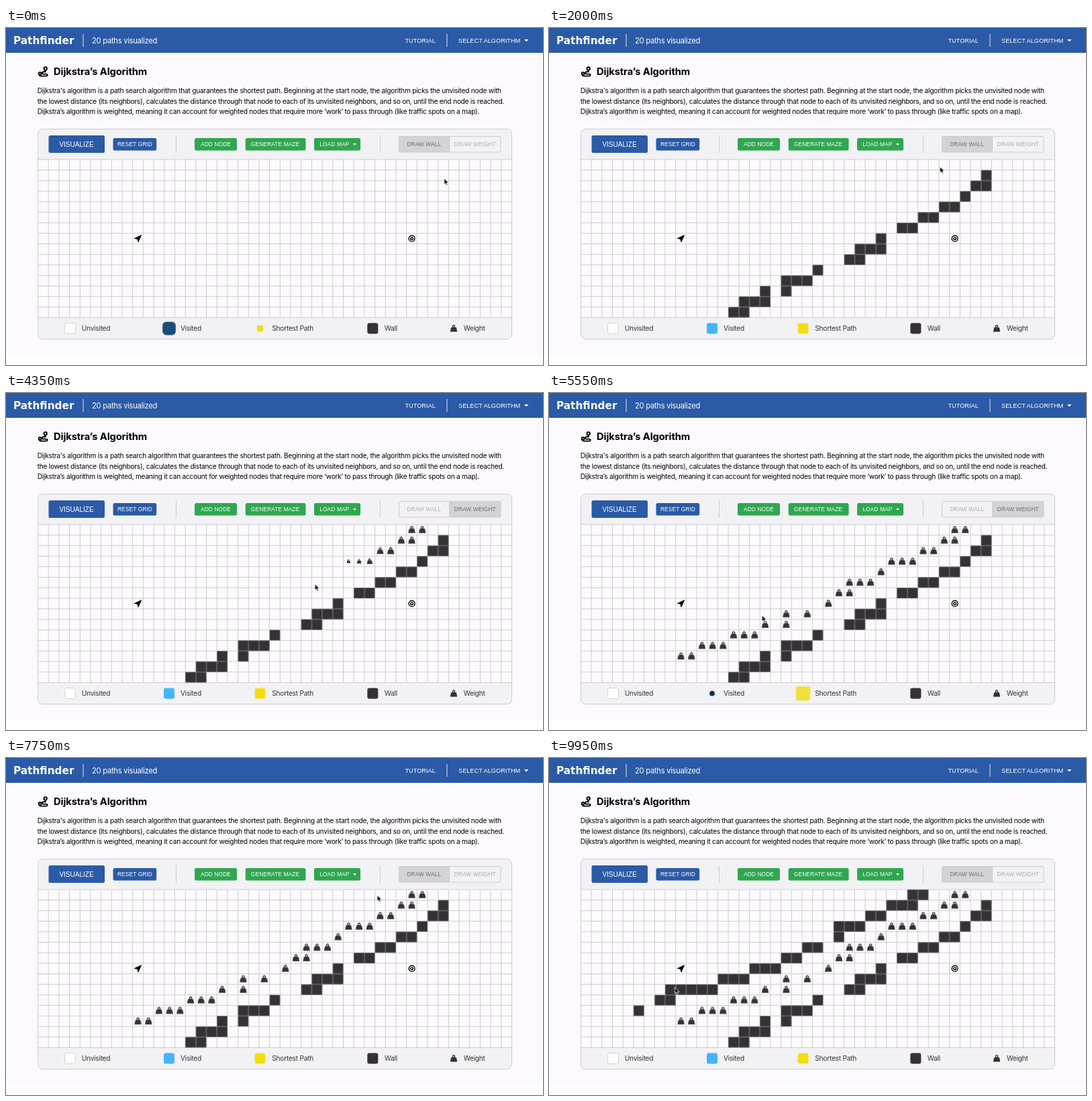
Recreate the animation shown at these times as an HTML page. Size 800 px wide and 502 px high, loop 10 s.

```html
<!DOCTYPE html>
<html lang="en">
<head>
<meta charset="utf-8">
<title>Pathfinder</title>
<style>
  html, body { margin: 0; width: 100%; height: 100%; overflow: hidden; background: #fcfafe; }
  svg { display: block; width: 800px; height: 502px; }
  text { font-family: Inter, "Open Sans", sans-serif; font-size: 10.2px; letter-spacing: -.255px; fill: #000; }
  .logo { font: bold 15.3px "DejaVu Sans", sans-serif; letter-spacing: 0; fill: #fff; }
  .count { font-size: 11.2px; letter-spacing: -.27px; fill: #fff; }
  .title { font-size: 14.7px; font-weight: 700; letter-spacing: -.1px; }
  .legend { fill: #333236; }
  .btn, .nav { font-family: "Liberation Sans", Arial, sans-serif; font-size: 8.4px; letter-spacing: .1px; fill: #fff; }
  .btn { text-anchor: middle; }
  .nav { font-size: 9.2px; letter-spacing: 0; }
  .big { font-size: 10px; letter-spacing: 0; }
  .blue { fill: #2b5aa6; }
  .green { fill: #2fa750; }
  .line { stroke: #cccbcf; fill: none; }
  .dark { fill: #343236; }
</style>
</head>
<body>
<svg viewBox="0 0 800 502" xmlns="http://www.w3.org/2000/svg">
  <defs>
    <rect id="wall" class="dark" x="-7.7" y="-7.7" width="15.4" height="15.4"/>
    <path id="weight" class="dark" fill-rule="evenodd" d="M-3.2-1.8H-1.7A2.3 2.3 0 1 1 1.7-1.8H3.2Q3.8-1.8 4-1.2L5.1 4Q5.2 4.8 4.4 4.8H-4.4Q-5.2 4.8-5.1 4L-4-1.2Q-3.8-1.8-3.2-1.8ZM0-4.3A1 1 0 1 0 0-2.3A1 1 0 1 0 0-4.3Z"/>
  </defs>

  <rect y="487" width="800" height="15" fill="#fff"/>
  <rect class="blue" width="800" height="37"/>
  <text class="logo" x="11" y="24">Pathfinder</text>
  <path d="M115 9V28M657 9V28" stroke="#fff" stroke-opacity=".85"/>
  <text class="count" x="128" y="22.5">20 paths visualized</text>
  <text class="nav" x="594.5" y="21.5">TUTORIAL</text>
  <text class="nav" x="674" y="21.5">SELECT ALGORITHM</text>
  <path d="M772 17h6.4l-3.2 3.5z" fill="#fff"/>

  <g fill="none" stroke="#000" stroke-width="1.9">
    <circle cx="58.7" cy="60.5" r="2.2"/>
    <path d="M58.7 63V65.3H56Q54 65.3 54 67T56 68.6H59.5Q61.7 68.6 61.7 70.1T59.5 71.6H51"/>
    <path d="M50.6 65a2.9 2.9 0 0 1 2.9 2.9q0 1.8-2.9 4.6q-2.9-2.8-2.9-4.6a2.9 2.9 0 0 1 2.9-2.9z" fill="#000" stroke="none"/>
    <circle cx="50.6" cy="67.8" r=".9" fill="#fff" stroke="none"/>
  </g>
  <text class="title" x="71" y="70.3">Dijkstra’s Algorithm</text>
  <text x="46.7" y="97.3">Dijkstra's algorithm is a path search algorithm that guarantees the shortest path. Beginning at the start node, the algorithm picks the unvisited node with</text>
  <text x="46.7" y="112.5">the lowest distance (its neighbors), calculates the distance through that node to each of its unvisited neighbors, and so on, until the end node is reached.</text>
  <text x="46.7" y="127.7">Dijkstra’s algorithm is weighted, meaning it can account for weighted nodes that require more ‘work’ to pass through (like traffic spots on a map).</text>

  <rect x="47.5" y="150.5" width="706" height="313" rx="7" fill="#f2f1f4" stroke="#cccbcf"/>
  <rect class="blue" x="63.5" y="160" width="83.5" height="26" rx="2.5"/>
  <text class="btn big" x="105" y="176.7">VISUALIZE</text>
  <rect class="blue" x="159.5" y="164" width="64.7" height="18.5" rx="2.5"/>
  <text class="btn" x="192" y="176.2">RESET GRID</text>
  <rect class="green" x="281" y="164" width="63" height="18.5" rx="2.5"/>
  <text class="btn" x="312.5" y="176.2">ADD NODE</text>
  <rect class="green" x="356.7" y="164" width="89.8" height="18.5" rx="2.5"/>
  <text class="btn" x="401" y="176.2">GENERATE MAZE</text>
  <rect class="green" x="459" y="164" width="69" height="18.5" rx="2.5"/>
  <text class="btn" x="489.3" y="176.2">LOAD MAP</text>
  <path d="M516.8 172h5.2l-2.6 3z" fill="#fff"/>
  <path class="line" d="M253.5 160V186M557.5 160V186"/>

  <rect id="wallTab" x="585.5" y="161.5" width="75" height="23.5"/>
  <rect id="weightTab" x="660.5" y="161.5" width="76.5" height="23.5"/>
  <rect class="line" x="585.5" y="161.5" width="151.5" height="23.5" rx="2"/>
  <path class="line" d="M660.5 161.5V185"/>
  <text id="wallLabel" class="btn" x="622.7" y="176.2">DRAW WALL</text>
  <text id="weightLabel" class="btn" x="698.7" y="176.2">DRAW WEIGHT</text>

  <rect x="48" y="196" width="705" height="235.5" fill="#fdfbfe"/>
  <path id="grid" class="line"/>
  <g id="cells"></g>
  <path d="M201.7 308.6L191.3 313.4L195.8 314.4L197 319z" stroke="#000" stroke-width=".8" stroke-linejoin="round"/>
  <g fill="none" stroke="#000" stroke-width="1.4">
    <circle cx="604.6" cy="313.7" r="4.4"/>
    <circle cx="604.6" cy="313.7" r="1.8"/>
  </g>

  <rect x="87.5" y="439.5" width="16" height="16" rx="3" fill="#fff" stroke="#d2d1d5"/>
  <g transform="translate(243 447.5)"><rect id="visited" x="-8" y="-8" width="16" height="16"/></g>
  <g transform="translate(378.5 447.5)"><rect id="shortest" x="-7.7" y="-7.7" width="15.4" height="15.4"/></g>
  <rect class="dark" x="538.3" y="439.5" width="16" height="16" rx="3"/>
  <use href="#weight" x="667" y="447.7"/>
  <text class="legend" x="112.7" y="451.3">Unvisited</text>
  <text class="legend" x="260" y="451.3">Visited</text>
  <text class="legend" x="396.3" y="451.3">Shortest Path</text>
  <text class="legend" x="563.8" y="451.3">Wall</text>
  <text class="legend" x="681.7" y="451.3">Weight</text>

  <path id="cursor" d="M0 0V9.2L2.1 7.3L3.5 10.5L5.1 9.8L3.7 6.7H6.6Z" fill="#000" stroke="#fff" stroke-width=".8" stroke-linejoin="round"/>
</svg>
<script>
const NS = "http://www.w3.org/2000/svg";
const LOOP = 10000, PACE = 45, GROW = 200;
const COLS = 45, ROWS = 15, CELL = 706 / COLS, LEFT = 47.5, TOP = 196;
const LAG = { wall: 80, weight: 150 };
const $ = id => document.getElementById(id);
const px = col => LEFT + col * CELL;
const py = row => TOP + row * CELL;

function play(el, steps) {
  el.animate(steps.map(([t, frame]) => ({ offset: t / LOOP, ...frame })),
    { duration: LOOP, iterations: Infinity });
}

let grid = "";
for (let c = 1; c < COLS; c++) grid += `M${px(c)} ${TOP}V431.5`;
for (let r = 0; r <= ROWS; r++) grid += `M${LEFT} ${py(r)}H753.5`;
$("grid").setAttribute("d", grid);

// Pointer stops between strokes: [time, column, row]
const trail = [
  [0, 38.6, 1.8], [2000, 34.1, .7], [2350, 41.5, -1.5], [2800, 41.5, -1.5],
  [5550, 17.2, 8.65], [6300, 36.6, -1.5], [6700, 36.6, -1.5], [7750, 32.25, .55],
  [9500, 5.4, 11.6], [9950, 8.95, 9.3], [LOOP, 9, 9.2]
];

function addCell(tool, col, row, t) {
  const g = document.createElementNS(NS, "g"), use = document.createElementNS(NS, "use");
  g.setAttribute("transform", `translate(${px(col + .5)} ${py(row + .5)})`);
  use.setAttribute("href", "#" + tool);
  g.append(use);
  $("cells").append(g);
  const size = s => ({ transform: `scale(${s})` });
  play(use, [[0, size(0)], [t, size(0)], [t, size(.4)], [t + GROW, size(1)], [LOOP, size(1)]]);
}

// Moves the pointer through each part at a steady pace and fills every cell it crosses;
// nothing is drawn between parts.
function stroke(tool, start, parts) {
  const seen = new Set();
  let t = start, prev = null;
  for (const part of parts) {
    part.forEach(([x, y], i) => {
      const [x0, y0] = prev || [x, y], len = Math.hypot(x - x0, y - y0);
      const n = i && 2 * Math.ceil(len * 4);
      for (let k = .5; k < n; k++) {
        const col = Math.floor(x0 + (x - x0) * k / n), row = Math.floor(y0 + (y - y0) * k / n);
        const key = col + "," + row;
        if (!seen.has(key)) addCell(tool, col, row, t + len * PACE * k / n + LAG[tool]);
        seen.add(key);
      }
      t += len * PACE;
      trail.push([t, x, y]);
      prev = [x, y];
    });
  }
}

const hook = (x, y) => [[x, y], [x - .2, y + .7], [x - 3.3, y + 2.1]];
stroke("wall", 90, [
  [[38.6, 1.8], [38.4, 2.1], [37, 3], [36, 4], [32, 6], [30.2, 6.9]],
  hook(28.5, 7.5),
  [[22.5, 10.5], [22, 11], [19.6, 11.6], [19.4, 12.4]],
  hook(17.5, 12.5)
]);
stroke("weight", 3824, [
  [[36.6, .3], [34, 2], [32, 3], [29, 4], [28, 5], [25.5, 6], [24, 7], [23.2, 7.8]],
  [[21.6, 8.3], [21.3, 8.6]],
  [[19.6, 8.4], [19.4, 9.4]],
  [[17.6, 9.4], [17, 10], [11, 12], [9.3, 12.8]]
]);
stroke("wall", 7950, [
  [[32.3, .6], [31.5, 1], [29, 2], [27, 3], [24.5, 4], [24.3, 4.6]],
  [[23, 5], [19, 7], [13, 9], [8.5, 10], [7.2, 10.6]],
  [[5.6, 11.5], [5.4, 11.6]]
]);

trail.sort((a, b) => a[0] - b[0]);
play($("cursor"), trail.map(([t, x, y]) => [t, { transform: `translate(${px(x) - .4}px, ${py(y) - .3}px)` }]));

function toggle(id, on, off, first) {
  const a = { fill: first ? on : off }, b = { fill: first ? off : on };
  play($(id), [[0, a], [2600, a], [2600, b], [6450, b], [6450, a], [LOOP, a]]);
}
for (const tool of ["wall", "weight"]) {
  toggle(tool + "Tab", "#d3d2d5", "#f2f1f4", tool === "wall");
  toggle(tool + "Label", "#6c6b6f", "#acabaf", tool === "wall");
}

// Legend swatches
const look = (s, fill, rx) => ({ transform: `scale(${s})`, fill, rx: rx + "px" });
const sky = look(1, "#45b4fe", 3), navy = look(1.23, "#1a4c7a", 4.5), teal = look(1.3, "#2196b4", 3.5);
play($("visited"), [
  [0, navy], [300, teal], [800, sky], [5500, sky], [5500, look(.42, "#0d2350", 8)],
  [6300, navy], [6600, teal], [7100, sky], [LOOP, sky]
]);
const gold = look(1, "#f3de0a", 2.5), seed = look(.6, "#f0dc18", 2.5), pale = look(1.42, "#f1e03e", 2.5);
play($("shortest"), [
  [0, seed], [500, pale], [1000, gold], [5100, gold], [5100, seed],
  [5570, pale], [6100, gold], [LOOP, gold]
]);
</script>
</body>
</html>
```
